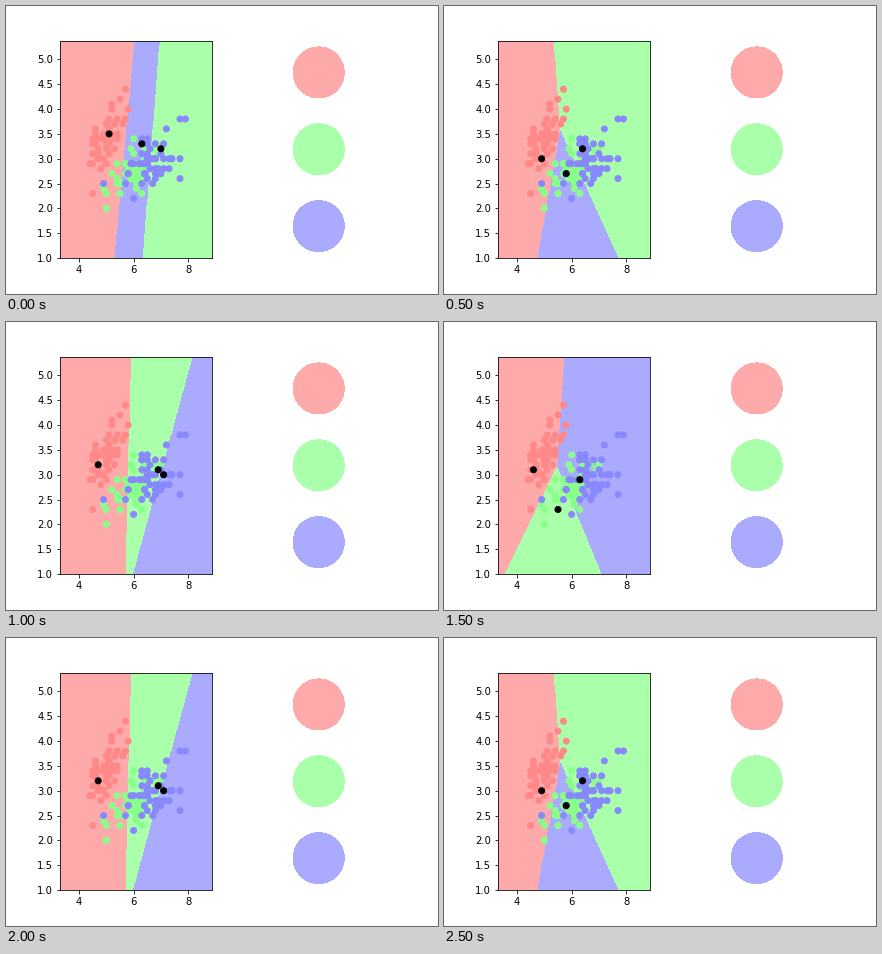
Recreate the animation shown at these times as a matplotlib script. Size 432x288 px, loop 3 s.

```python
import numpy as np
import matplotlib.pyplot as plt
from matplotlib.animation import FuncAnimation
from matplotlib.colors import ListedColormap

LIGHT = ["#FFAAAA", "#AAFFAA", "#AAAAFF"]
BOLD = ["#FF8888", "#88FF88", "#8888FF"]
STEP = 0.02
CORE = 40

# One sample of each class decides the regions.
SEEDS = np.array([
    [(5.1, 3.5), (7.0, 3.2), (6.3, 3.3)],
    [(4.9, 3.0), (6.4, 3.2), (5.8, 2.7)],
    [(4.7, 3.2), (6.9, 3.1), (7.1, 3.0)],
    [(4.6, 3.1), (5.5, 2.3), (6.3, 2.9)],
])
ORDER = [0, 1, 2, 3, 2, 1]

# Centre, spread and correlation of each class, then its outermost points.
CLOUDS = [
    ((5.0, 3.4), (0.35, 0.36), 0.72,
     [(5.7, 4.4), (5.5, 4.2), (5.2, 4.1), (5.8, 4.0), (5.7, 3.8),
      (4.6, 3.6), (4.5, 2.3)]),
    ((5.95, 2.8), (0.48, 0.28), 0.5,
     [(5.0, 2.0), (4.9, 2.4), (5.0, 2.3), (5.2, 2.7), (6.3, 2.3),
      (5.9, 3.2), (6.0, 3.4)]),
    ((6.55, 2.97), (0.55, 0.27), 0.45,
     [(4.9, 2.5), (6.0, 2.2), (5.7, 2.5), (6.7, 2.5), (7.7, 2.6),
      (7.7, 3.0), (7.2, 3.6), (7.7, 3.8), (7.9, 3.8)]),
]


def class_points(k, rng):
    """Seeds, outer points and a dense core, measured to one decimal."""
    (mx, my), (sx, sy), rho, outer = CLOUDS[k]
    r = 1.9 * rng.random(CORE)
    angle = 2 * np.pi * rng.random(CORE)
    a, b = r * np.cos(angle), r * np.sin(angle)
    core = np.column_stack([mx + sx * a,
                            my + sy * (rho * a + np.sqrt(1 - rho ** 2) * b)])
    return np.vstack([SEEDS[:, k], outer, core.round(1)])


def nearest(seeds):
    """Index of the closest seed at each grid point."""
    return np.argmin([(gx - x) ** 2 + (gy - y) ** 2 for x, y in seeds], axis=0)


fig, (ax, key) = plt.subplots(1, 2, figsize=(6, 4), dpi=72)
fig.subplots_adjust(left=0.125, right=0.9, bottom=0.125, top=0.88, wspace=0.2)

xs = 3.3 + STEP * np.arange(280)
ys = 1.0 + STEP * np.arange(220)
gx, gy = np.meshgrid(xs, ys)
mesh = ax.pcolormesh(gx, gy, nearest(SEEDS[0]), cmap=ListedColormap(LIGHT),
                     vmin=0, vmax=2, shading="nearest")

rng = np.random.default_rng(4)
clouds = [class_points(k, rng) for k in range(3)]
labels = np.repeat(range(3), [len(c) for c in clouds])
ax.scatter(*np.vstack(clouds).T, c=labels, cmap=ListedColormap(BOLD))
# A colour per point keeps the dots from snapping to whole pixels.
dots = ax.scatter(*SEEDS[0].T, c=["black"] * 3)
ax.set(xlim=(xs[0], xs[-1]), ylim=(ys[0], ys[-1]),
       xticks=[4, 6, 8], yticks=np.arange(1, 5.1, 0.5))

key.scatter([0, 0, 0], [1, 0, -1], s=2500, c=LIGHT, antialiased=False)
key.set(xlim=(-1, 1), ylim=(-1.415, 1.415))
key.axis("off")


def update(i):
    seeds = SEEDS[ORDER[i]]
    mesh.set_array(nearest(seeds))
    dots.set_offsets(seeds)
    return mesh, dots


anim = FuncAnimation(fig, update, frames=len(ORDER), interval=500, repeat=True)
plt.show()
```
